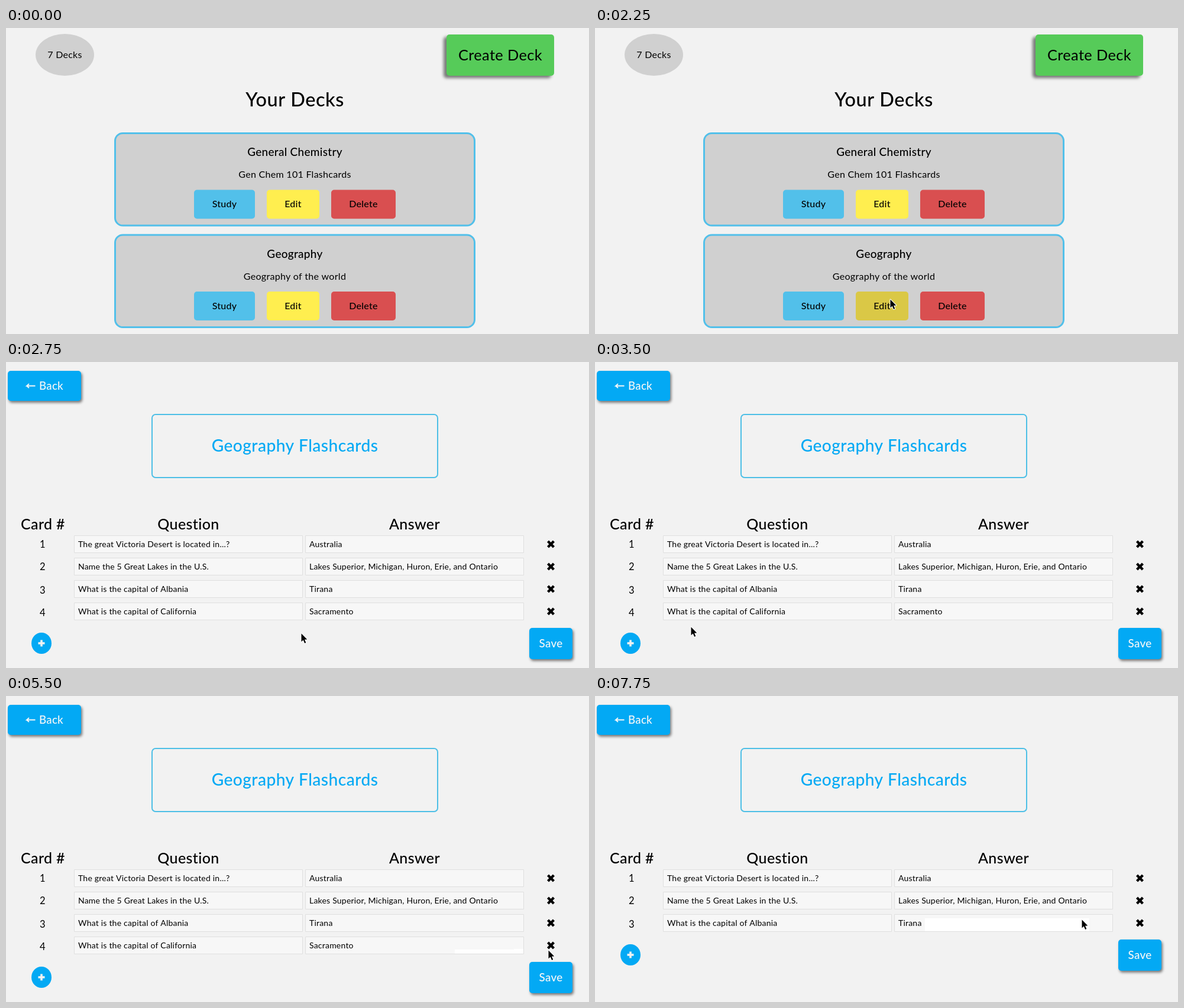
An HTML page with a canvas that plays this animation: 986x519 px, repeating every 8000 ms.

```html
<!DOCTYPE html>
<html lang="en">
<head>
<meta charset="utf-8">
<title>Flashcard decks</title>
<style>
html, body { margin: 0; width: 100%; height: 100%; overflow: hidden; background: #f2f2f2; }
canvas { display: block; }
</style>
</head>
<body>
<canvas id="stage" width="986" height="519"></canvas>
<script>
const ctx = document.getElementById('stage').getContext('2d');
const LOOP = 8000, STEP = 250;
const BLUE = '#03a9f4', SKY = '#52c0ea', GREY = '#d0d0d0', PAGE = '#f2f2f2', PALE = '#f7f7f7';
const ARROW = new Path2D('M0 0V14L3.2 11L5.6 16.5L7.8 15.5L5.5 10.2L9.8 10Z');

const HOME = { x: 666, y: 38 };
const MOVES = [
  { from: 500, to: 1500, x: 489, y: 472 },
  { from: 1500, to: 2250, x: 499, y: 460 },
  { from: 3000, to: 3500, x: 162, y: 449 },
  { from: 3500, to: 4250, x: 643, y: 459 },
  { from: 4250, to: 5000, x: 800, y: 432 },
  { from: 5000, to: 5500, x: 917, y: 431 },
  { from: 5500, to: 6000, x: 917, y: 424 },
  { from: 6750, to: 7500, x: 558, y: 380 },
  { from: 7500, to: 7750, x: 823, y: 379 }
];

const CARDS = [
  ['The great Victoria Desert is located in...?', 'Australia'],
  ['Name the 5 Great Lakes in the U.S.', 'Lakes Superior, Michigan, Huron, Erie, and Ontario'],
  ['What is the capital of Albania', 'Tirana'],
  ['What is the capital of California', 'Sacramento']
];

const rowY = i => 309 + 38 * i;

function tipAt(t) {
  let { x, y } = HOME;
  for (const m of MOVES) {
    const p = Math.min(1, Math.max(0, (t - m.from) / (m.to - m.from)));
    const ease = p * p * (3 - 2 * p);
    x += (m.x - x) * ease;
    y += (m.y - y) * ease;
  }
  return { x: Math.round(x), y: Math.round(y) };
}

function text(str, x, y, size, { color = '#000', weight = 400, align = 'center' } = {}) {
  ctx.font = `${weight} ${size}px Lato, sans-serif`;
  ctx.letterSpacing = size * 0.015 + 'px';
  ctx.textAlign = align;
  ctx.fillStyle = color;
  ctx.fillText(str, x, y);
}

function box(x, y, w, h, r, fill, stroke, line) {
  ctx.beginPath();
  ctx.roundRect(x, y, w, h, r);
  if (fill) { ctx.fillStyle = fill; ctx.fill(); }
  if (stroke) { ctx.strokeStyle = stroke; ctx.lineWidth = line; ctx.stroke(); }
}

function raised(x, y, w, h, fill, dx = 2, dy = 3, blur = 4) {
  ctx.save();
  ctx.shadowColor = 'rgba(0,0,0,.5)';
  ctx.shadowOffsetX = dx;
  ctx.shadowOffsetY = dy;
  ctx.shadowBlur = blur;
  box(x, y, w, h, 5, fill);
  ctx.restore();
}

function disc(x, y, rx, ry, fill) {
  ctx.beginPath();
  ctx.ellipse(x, y, rx, ry, 0, 0, Math.PI * 2);
  ctx.fillStyle = fill;
  ctx.fill();
}

function cross(x, y, r, angle, color, width) {
  ctx.save();
  ctx.translate(x, y);
  ctx.rotate(angle);
  ctx.fillStyle = color;
  ctx.fillRect(-r, -width / 2, 2 * r, width);
  ctx.fillRect(-width / 2, -r, width, 2 * r);
  ctx.restore();
}

function deck(y, title, note, hover) {
  box(184.5, y + 1.5, 608, 156.5, 13, GREY, SKY, 3);
  text(title, 488.5, y + 40, 19, { weight: 500 });
  text(note, 488.5, y + 77, 16.1);
  const button = (x, w, label, fill) => {
    box(x, y + 97.5, w, 49, 5, fill);
    text(label, x + w / 2, y + 127, 16, { weight: 500 });
  };
  button(318, 103, 'Study', SKY);
  button(441, 89, 'Edit', hover ? '#dac846' : '#ffee4f');
  button(550, 109, 'Delete', '#d94f50');
}

function decksPage(t) {
  disc(99.5, 45.5, 49.5, 35.5, GREY);
  text('7 Decks', 99.5, 51, 16);
  raised(745, 11, 182, 70, '#56cb59', -5, 4, 5);
  text('Create Deck', 836, 55, 25.4);
  text('Your Decks', 488.5, 132.5, 32.5, { weight: 500 });
  deck(177, 'General Chemistry', 'Gen Chem 101 Flashcards', false);
  deck(349.5, 'Geography', 'Geography of the world', t >= 1750);
}

function controls(x, y, hover) {
  disc(x, y, 17, 18, BLUE);
  cross(x, y, 5.5, 0, PAGE, 3.6);
  raised(885, y - 26, 73, 53, hover ? '#0390d0' : BLUE);
  text('Save', 921.5, y + 7, 18.9, { color: hover ? '#bcd3e0' : PALE, weight: 500 });
}

function cardRow(i) {
  const y = rowY(i), [question, answer] = CARDS[i];
  // Old-style figures: 3 and 4 hang below the line.
  text(i + 1, 62, y + (i < 2 ? 6 : 8), 16.5);
  const field = (x, w, value) => {
    box(x, y - 14.5, w, 29, 0, PALE, '#dfdfdf', 1);
    text(value, x + 6.5, y + 5, 14, { align: 'left' });
  };
  field(115.5, 386, question);
  field(506.5, 369, answer);
  cross(921.5, y, 7, Math.PI / 4, '#000', 4.4);
}

// White streak the pointer leaves inside an answer field.
function streak(since, t, row) {
  ctx.save();
  ctx.beginPath();
  ctx.rect(507, rowY(row) - 14, 368, 28);
  ctx.clip();
  ctx.fillStyle = '#fff';
  for (let s = since + STEP; s <= t; s += STEP) {
    const a = tipAt(s - STEP), b = tipAt(s);
    ctx.fillRect(a.x, Math.min(a.y, b.y) - 2, b.x + 13 - a.x, 24);
  }
  ctx.restore();
}

function editPage(t) {
  const head = (label, x, y) => text(label, x, y, 25, { weight: 500 });
  raised(3, 15, 124, 51, BLUE);
  ctx.strokeStyle = PALE;
  ctx.lineWidth = 1.8;
  ctx.stroke(new Path2D('M49.5 40.5H35L39 37M35 40.5L39 44'));
  text('Back', 76.5, 47, 18.7, { color: PALE, weight: 500 });
  box(247, 89, 483, 107, 6, null, '#4dbfe6', 2);
  text('Geography Flashcards', 488.5, 152, 28.2, { color: BLUE, weight: 500 });

  if (t < 2750) {
    head('Card', 41.5, 284);
    head('#', 41.5, 314);
    head('Question', 428.5, 299);
    head('Answer', 832.5, 299);
    controls(39, 355, false);
    return;
  }
  head('Card #', 62.5, 284);
  head('Question', 308.5, 284);
  head('Answer', 691, 284);
  const rows = t < 6000 ? 4 : 3;
  for (let i = 0; i < rows; i++) cardRow(i);
  if (rows === 4) streak(4750, t, 3);
  else streak(7500, t, 2);
  controls(60, rowY(rows) + 16, t >= 6250 && t < 7250);
}

function pointer(t) {
  if (t < MOVES[0].from) return;
  const { x, y } = tipAt(t);
  ctx.save();
  ctx.translate(x + 0.5, y + 0.5);
  ctx.lineJoin = 'round';
  ctx.strokeStyle = '#fff';
  ctx.lineWidth = 2;
  ctx.stroke(ARROW);
  ctx.fillStyle = '#000';
  ctx.fill(ARROW);
  ctx.restore();
}

const start = performance.now();

function draw() {
  const elapsed = (performance.now() - start) % LOOP;
  const t = Math.floor(elapsed / STEP) * STEP;
  ctx.fillStyle = PAGE;
  ctx.fillRect(0, 0, 986, 519);
  if (t < 2500) decksPage(t);
  else editPage(t);
  pointer(t);
  requestAnimationFrame(draw);
}
draw();
</script>
</body>
</html>
```
